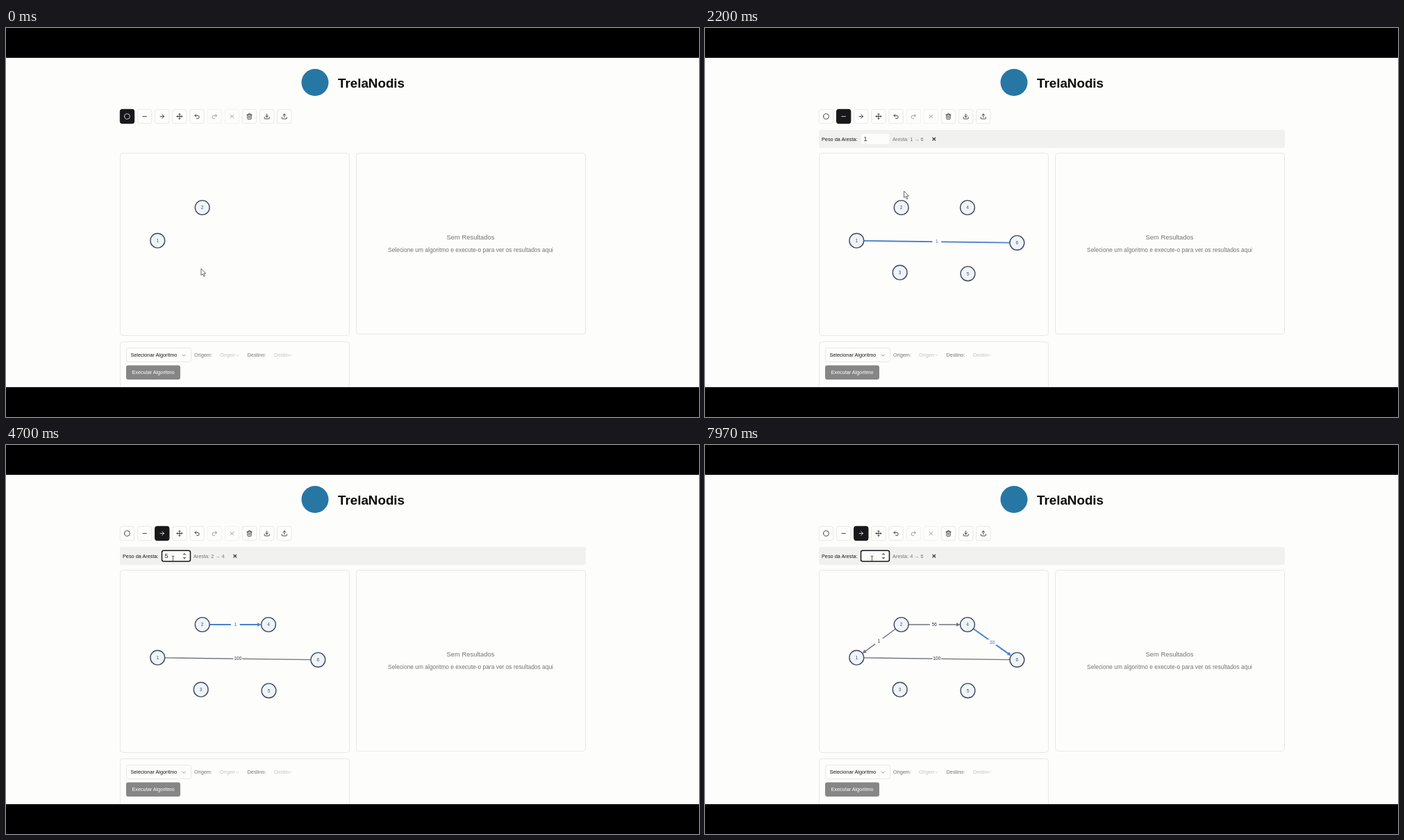
An HTML page that plays this animation: 998 by 561 pixels, repeating every 8 s.

```html
<!DOCTYPE html>
<html lang="pt">
<head>
<meta charset="utf-8">
<style>
  html, body { margin: 0; width: 100%; height: 100%; overflow: hidden; background: #000; }
  svg { display: block; }
  text { font-family: "Liberation Sans", Arial, sans-serif; font-size: 7.3px; fill: #18181b; }
  .mid { text-anchor: middle; }
  .muted { fill: #737373; }
  .faint { fill: #c4c4c4; }
  .panel { fill: #fdfdfc; stroke: #e8e8e6; }
  .icon { fill: none; stroke-width: 2; stroke-linecap: round; stroke-linejoin: round; }
  .node circle { fill: #eff4f8; stroke: #414a5b; stroke-width: 1.4; }
  .node text { fill: #4a5260; font-size: 6.6px; }
  .edge text { font-size: 6.5px; }
</style>
</head>
<body>
<svg width="100%" height="100%" viewBox="0 0 998 561">
  <defs><clipPath id="page"><rect y="43" width="998" height="475"/></clipPath></defs>
  <rect width="998" height="561"/>
  <g clip-path="url(#page)">
    <rect y="43" width="998" height="475" fill="#fdfdfc"/>
    <circle cx="445" cy="78.5" r="19.5" fill="#2777a4"/>
    <text x="478" y="85.6" style="font-size:18.8px;font-weight:bold;fill:#0a0a0a">TrelaNodis</text>
    <g id="tools"></g>

    <g id="bar">
      <rect x="164" y="147" width="671" height="26" rx="3" fill="#f1f1ef"/>
      <text x="168" y="162.7">Peso da Aresta:</text>
      <rect id="field" x="224.5" y="152.2" width="41" height="15.6" rx="2.5" fill="#fdfdfc"/>
      <text id="weight" x="228.4" y="163.2" style="font-size:8.8px"></text>
      <path id="spinner" d="M254.5 158.6l2.5-3.2 2.5 3.2zM254.5 161.8l2.5 3.2 2.5-3.2z" fill="#777"/>
      <text id="edgeName" class="muted" x="270" y="162.7"></text>
      <path d="M327.5 157.8l4.6 4.6m0-4.6l-4.6 4.6" stroke="#222" stroke-width="1.1"/>
    </g>

    <rect class="panel" x="164.5" y="180.5" width="330" height="263" rx="4"/>
    <rect class="panel" x="504.5" y="180.5" width="330" height="261" rx="4"/>
    <rect class="panel" x="164.5" y="452.5" width="330" height="90" rx="4"/>
    <text class="mid muted" x="669" y="305.4" style="font-size:9.4px">Sem Resultados</text>
    <text class="mid muted" x="669" y="323" style="font-size:8.41px">Selecione um algoritmo e execute-o para ver os resultados aqui</text>

    <rect class="panel" x="173.5" y="461.5" width="93" height="20" rx="3"/>
    <text x="179.4" y="474.2">Selecionar Algoritmo</text>
    <path class="icon" d="M254 471l2.2 2.2 2.2-2.2" stroke="#888" style="stroke-width:.9"/>
    <text class="muted" x="271" y="474.2">Origem:</text>
    <text class="muted" x="347.6" y="474.2">Destino:</text>
    <svg x="308" y="462" width="22" height="20"><text class="faint" y="12.2">Origem</text></svg>
    <svg x="386" y="462" width="22" height="20"><text class="faint" y="12.2">Destino</text></svg>
    <path class="icon" d="M331.3 471l1.9 1.9 1.9-1.9M408 471l1.6 1.6 1.6-1.6" stroke="#ccc" style="stroke-width:.8"/>
    <rect x="173" y="486.5" width="78" height="20.5" rx="3" fill="#868687"/>
    <text class="mid" x="212" y="499.4" style="fill:#fff">Executar Algoritmo</text>

    <line id="drag" stroke="#8a8a8c"/>
    <g id="edges"></g>
    <g id="nodes"></g>

    <g id="cursors">
      <path d="M0 0v9.6l2.2-2 1.7 3.8 1.6-.7-1.7-3.6h3z" fill="#fff" stroke="#444" stroke-width=".8"/>
      <path d="M-.5 0c.1-1.2 1.5-1.2 1.6 0v3.6l3.3.7c.8.2 1.1.6 1.1 1.4l-.5 3.6-.8 1.9H-.2L-2.9 7.3c-.6-.9.4-1.7 1.2-1l1.2 1z" fill="#fff" stroke="#333" stroke-width=".8"/>
      <path d="M-1.8-3.8h1.4l.4.4.4-.4h1.4M0-3.4v6.8M-1.8 3.8h1.4l.4-.4.4.4h1.4" fill="none" stroke="#333" stroke-width=".8"/>
    </g>
  </g>
</svg>
<script>
const LOOP = 8000, RADIUS = 10.4;
const TRAVEL = 240, DWELL = 60;          // pointer move, then pause before it acts
const FIRST_KEY = 130, KEY = 100;        // typing rhythm

const $ = id => document.getElementById(id);
const set = (el, attrs) => { for (const k in attrs) el.setAttribute(k, attrs[k]); };
const show = (el, on) => { el.style.display = on ? '' : 'none'; };
const clamp = (v, lo, hi) => Math.min(hi, Math.max(lo, v));

// Fills a group with one element per item and links each item to its element.
function build(id, items, markup) {
  $(id).innerHTML = items.map(markup).join('');
  items.forEach((item, i) => { item.el = $(id).children[i]; });
}

const tray = 'M21 15v4a2 2 0 0 1-2 2H5a2 2 0 0 1-2-2v-4';
const tools = [
  'M2 12a10 10 0 1 0 20 0a10 10 0 1 0-20 0',
  'M5 12h14',
  'M5 12h14M12 5l7 7-7 7',
  'M12 2v20M2 12h20M15 19l-3 3-3-3M19 9l3 3-3 3M5 9l-3 3 3 3M9 5l3-3 3 3',
  'M9 14L4 9l5-5M4 9h10.5a5.5 5.5 0 0 1 0 11H11',
  'M15 14l5-5-5-5M20 9H9.5a5.5 5.5 0 0 0 0 11H13',
  'M18 6L6 18M6 6l12 12',
  'M3 6h18M19 6v14a2 2 0 0 1-2 2H7a2 2 0 0 1-2-2V6M8 6V4a2 2 0 0 1 2-2h4a2 2 0 0 1 2 2v2M10 11v6M14 11v6',
  tray + 'M7 10l5 5 5-5M12 15V3',
  tray + 'M17 8l-5-5-5 5M12 3v12'
].map((icon, i) => ({ icon, x: 174.5 + i * 25.15, y: 127.5, disabled: i === 5 || i === 6 }));

build('tools', tools, ({ icon, x, y }) => `
  <g transform="translate(${x} ${y})">
    <rect x="-10.2" y="-10.2" width="20.4" height="20.4" rx="3"/>
    <path class="icon" transform="scale(.39) translate(-12 -12)" d="${icon}"/>
  </g>`);

const nodes = [[218.3, 306.7], [282.7, 259], [280.7, 352.7], [378, 259], [378.5, 354.3], [449.4, 309.8]]
  .map(([x, y]) => ({ x, y }));

build('nodes', nodes, ({ x, y }, i) => `
  <g class="node" transform="translate(${x} ${y})">
    <circle r="${RADIUS}"/><text class="mid" y="2.3">${i + 1}</text>
  </g>`);

// Each edge is dragged out at `start`; one with a weight is then selected and edited.
const edges = [
  { a: 1, b: 6, start: 1320, weight: '100' },
  { a: 2, b: 4, start: 3460, weight: '56', arrow: true },
  { a: 4, b: 6, start: 5240, weight: '30', arrow: true },
  { a: 2, b: 1, start: 6640, arrow: true }
];
for (const e of edges) {
  e.from = nodes[e.a - 1];
  e.to = nodes[e.b - 1];
  const dx = e.to.x - e.from.x, dy = e.to.y - e.from.y;
  e.length = Math.hypot(dx, dy);
  e.angle = Math.atan2(dy, dx) * 180 / Math.PI;
  e.along = d => ({ x: e.from.x + dx * d / e.length, y: e.from.y + dy * d / e.length });
  e.middle = e.along(e.length / 2);
  e.release = e.along(e.length - (e.arrow ? 8 : 1));
}

build('edges', edges, ({ from, angle, length, middle, arrow }) => {
  const end = length - RADIUS;
  return `<g class="edge">
    <g transform="translate(${from.x} ${from.y}) rotate(${angle})">
      <line x1="${RADIUS}" x2="${arrow ? end - 2 : end}"/>
      ${arrow ? `<path d="M${end} 0l-5.5-2.8v5.6z" stroke="none"/>` : ''}
    </g>
    <rect x="${middle.x - 6.4}" y="${middle.y - 4}" width="12.8" height="8" fill="#fdfdfc"/>
    <text class="mid" x="${middle.x}" y="${middle.y + 2.2}"></text>
  </g>`;
});

// The session: where the pointer arrives, when, and what its click does to the state.
const field = { x: 240.5, y: 164 };
const script = [];
const step = (time, { x, y }, act = () => {}) => script.push({ time, x, y, act });
const pickTool = (time, i) => step(time, tools[i], s => { s.tool = i; s.focused = false; });

step(-DWELL, { x: 281, y: 347 });
nodes.slice(2).forEach((n, i) => step(40 + 265 * i, n, s => { s.nodes++; }));
pickTool(1080, 1);
step(3130, { x: 239, y: 130 });
pickTool(3240, 2);
for (const e of edges) {
  step(e.start, e.from, s => { s.held = e; s.focused = false; });
  step(e.start + 290, e.release, s => { s.held = null; s.edges++; });
  step(e.start + 700, e.middle, s => { if (e.weight) s.selected = e; });
  step(e.start + 1000, field, s => { s.focused = true; });
}
script.sort((p, q) => p.time - q.time);

function stateAt(t) {
  const state = { tool: 0, nodes: 2, edges: 0, held: null, selected: null, focused: false };
  for (const s of script) if (s.time + DWELL <= t) s.act(state);
  return state;
}

function pointerAt(t) {
  const i = script.findIndex(s => s.time > t);
  if (i < 0) return script[script.length - 1];
  const p = script[i - 1], q = script[i];
  const leave = Math.max(p.time + DWELL, q.time - TRAVEL);
  const u = clamp((t - leave) / (q.time - leave), 0, 1), s = u * u * (3 - 2 * u);
  return { x: p.x + (q.x - p.x) * s, y: p.y + (q.y - p.y) * s };
}

// Typed digits so far; the key after the last digit confirms and empties the field.
function typing({ start, weight }, t) {
  const keys = Math.floor((t - start - 1000 - DWELL - FIRST_KEY) / KEY) + 1;
  const done = weight && keys > weight.length;
  return { text: done || !weight ? '' : weight.slice(0, Math.max(keys, 0)), label: done ? weight : '1' };
}

function drawTools(active, { x, y }) {
  const hovered = Math.abs(y - 127.5) < 10.5
    ? tools.findIndex(b => !b.disabled && x > b.x - 12.5 && x < b.x + 10.5) : -1;
  tools.forEach(({ el, disabled }, i) => {
    const on = i === active;
    set(el.children[0], {
      fill: on ? '#18181b' : i === hovered ? '#f0f0ee' : '#fdfdfc',
      stroke: on ? '#18181b' : disabled ? '#f2f2f0' : '#e8e8e6'
    });
    set(el.children[1], { stroke: on ? '#fff' : disabled ? '#858585' : '#18181b' });
  });
  return hovered >= 0;
}

function drawEdges(t, { edges: count, selected }) {
  edges.forEach((e, i) => {
    const on = e === selected, color = on ? '#4a80cf' : '#71757f';
    show(e.el, i < count);
    set(e.el.children[0], { stroke: color, fill: color, 'stroke-width': on ? 1.9 : 1.4 });
    const label = e.el.querySelector('text');
    label.textContent = typing(e, t).label;
    label.style.fill = on ? '#4a70b0' : '#34373d';
  });
}

function drawBar(t, { selected, focused }) {
  show($('bar'), selected);
  if (!selected) return;
  const { text, label } = typing(selected, t);
  set($('field'), { stroke: focused ? '#18181b' : '#f0f0ee', 'stroke-width': focused ? 1.5 : .8 });
  show($('spinner'), focused);
  $('weight').textContent = focused ? text : label;
  $('edgeName').textContent = `Aresta: ${selected.a} → ${selected.b}`;
}

function drawDrag({ held }, { x, y }) {
  show($('drag'), held);
  if (held) set($('drag'), {
    x1: held.from.x, y1: held.from.y, x2: x, y2: y + 1.5, 'stroke-width': held.arrow ? 1.7 : .9
  });
}

function draw(t) {
  const state = stateAt(t), tip = pointerAt(t);
  nodes.forEach((n, i) => show(n.el, i < state.nodes));
  const overTool = drawTools(state.tool, tip);
  drawEdges(t, state);
  drawBar(t, state);
  drawDrag(state, tip);
  const overField = state.selected && Math.abs(tip.x - 245) < 21 && Math.abs(tip.y - 160) < 8;
  const shape = overTool ? 1 : overField ? 2 : 0;
  [...$('cursors').children].forEach((el, i) => show(el, i === shape));
  set($('cursors'), { transform: `translate(${tip.x} ${tip.y})` });
}

const begin = performance.now();
function tick() {
  draw((performance.now() - begin) % LOOP);
  requestAnimationFrame(tick);
}
tick();
</script>
</body>
</html>
```
